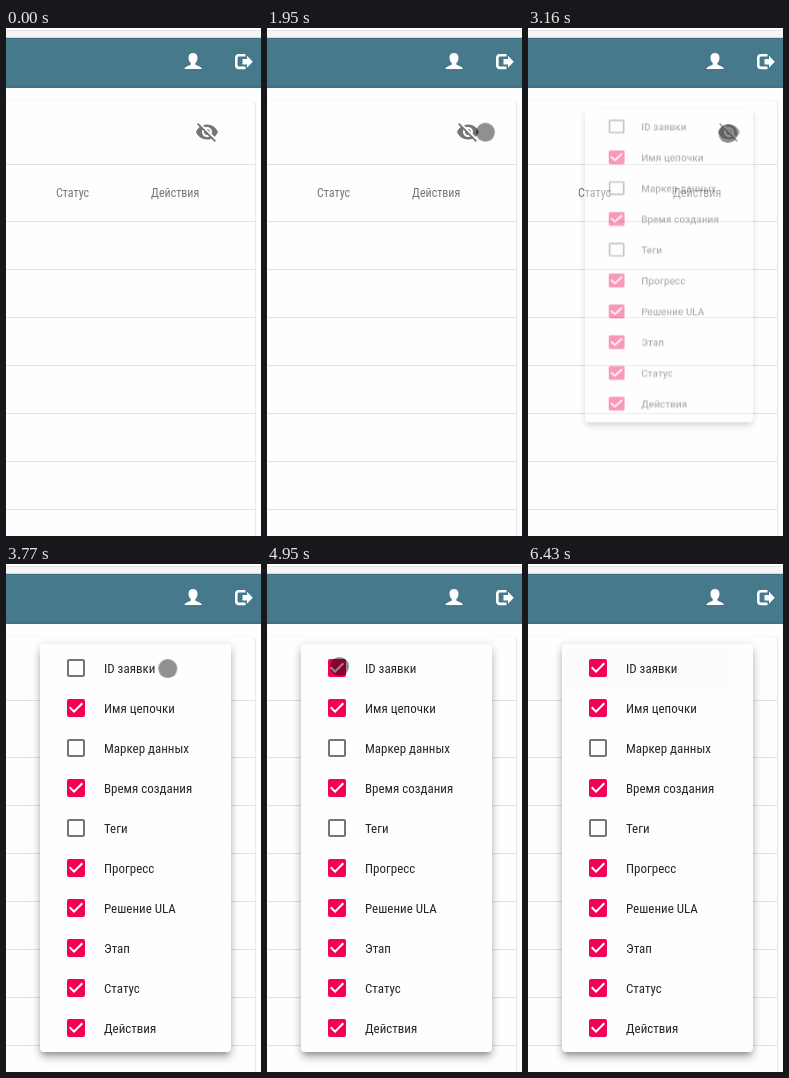
An HTML page that plays this animation: 255 by 508 pixels, repeating every 7340 ms.

```html
<!DOCTYPE html>
<html lang="ru">
<head>
<meta charset="utf-8">
<title>Настройка столбцов</title>
<style>
  html, body { margin: 0; width: 100%; height: 100%; overflow: hidden; background: #fefefe; }
  body { position: relative; font-family: "Roboto Condensed", Roboto, sans-serif; font-stretch: 75%; }
  body.wide { letter-spacing: -.06em; }
  body.wide text { font-size: 12px; }
  body > *, svg { position: absolute; left: 0; top: 0; }
  svg { width: 255px; height: 508px; overflow: visible; }
  #card {
    left: -20px; top: 73px; width: 269px; height: 460px; border-radius: 3px; background: #fefefe;
    box-shadow: 0 1px 2px rgba(0,0,0,.26), 0 0 1px rgba(0,0,0,.16);
  }
  #menu { width: 255px; height: 508px; transform-origin: 225px 80px; }
  #sheet {
    position: absolute; left: 34px; top: 80px; width: 191px; height: 408px; border-radius: 4px; background: #fefefe;
    box-shadow: 0 5px 5px -3px rgba(0,0,0,.24), 0 7px 9px 0 rgba(0,0,0,.16), 0 2px 9px 1px rgba(0,0,0,.14);
  }
  #hover { position: absolute; left: 37px; top: 84px; width: 164px; height: 40px; background: #fbfbfb; }
  #dot { left: -9.5px; top: -9.5px; width: 19px; height: 19px; border-radius: 50%; background: rgba(0,0,0,.43); }
  text { font-size: 13px; fill: #262626; }
  .head text { font-size: 12px; fill: #757575; }
</style>
</head>
<body>
<div id="card"></div>
<svg>
  <rect width="255" height="10" fill="#f5f5f5"/>
  <rect width="255" height="2" fill="#fdfdfd"/>
  <rect y="2" width="255" height="1" fill="#e6e6e6"/>
  <rect y="9" width="255" height="1" fill="#d3dbde"/>
  <rect y="10" width="255" height="50" fill="#45798b"/>
  <rect y="10" width="255" height="1" fill="#3d6f80"/>
  <rect y="58" width="255" height="2" fill="#40708a"/>
  <g fill="#fff">
    <path d="M187 25c2.900 0 4.500 2 4.500 4.800 0 2.400-1 4.400-2.200 5.400v1.300c1 1 6.200 1.800 6.600 4.500H178.500c.4-2.700 5.400-3.500 6.400-4.500v-1.300c-1.300-1-2.400-3-2.400-5.400C182.500 27 184.100 25 187 25z"/>
    <path d="M238 31h3v-3.200l5.800 6-5.800 6v-3.300h-4.500V31z"/>
  </g>
  <path d="M239.500 27.300H233a2.700 2.700 0 0 0-2.700 2.700v7.200a2.700 2.700 0 0 0 2.700 2.700h6.500" fill="none" stroke="#fff" stroke-width="2.600"/>
  <g id="lines" fill="#e0e0e0"></g>
  <g class="head"><text x="50" y="169">Статус</text><text x="145" y="169">Действия</text></g>
  <path transform="translate(189 92)" fill="#757575" d="M12 7c2.760 0 5 2.240 5 5 0 .65-.13 1.260-.36 1.830l2.920 2.920c1.510-1.260 2.700-2.890 3.430-4.750-1.730-4.390-6-7.500-11-7.500-1.400 0-2.740.25-3.980.7l2.160 2.160C10.740 7.130 11.350 7 12 7zM2 4.270l2.740 2.740C3.080 8.300 1.780 10.020 1 12c1.730 4.390 6 7.500 11 7.500 1.550 0 3.030-.3 4.380-.84L19.730 22 21 20.730 3.270 3 2 4.270zM7.530 9.800l1.550 1.550c-.05.21-.08.43-.08.65 0 1.660 1.340 3 3 3 .22 0 .44-.03.65-.08l1.550 1.550c-.67.33-1.410.53-2.200.53-2.760 0-5-2.240-5-5 0-.79.2-1.530.53-2.200zm4.310-.78l3.150 3.150.02-.16c0-1.660-1.340-3-3-3l-.17.01z"/>
</svg>
<div id="menu">
  <div id="sheet"></div>
  <div id="hover"></div>
  <svg id="list"></svg>
</div>
<div id="dot"></div>
<script>
const LOOP = 7340;
const $ = id => document.getElementById(id);

const ON = 'M19 3H5c-1.110 0-2 .9-2 2v14c0 1.100.89 2 2 2h14c1.110 0 2-.9 2-2V5c0-1.100-.89-2-2-2zm-9 14l-5-5 1.410-1.410L10 14.170l7.590-7.590L19 8l-9 9z';
const OFF = 'M19 5v14H5V5h14m0-2H5c-1.100 0-2 .9-2 2v14c0 1.100.9 2 2 2h14c1.100 0 2-.9 2-2V5c0-1.100-.9-2-2-2z';
const rows = [
  ['ID заявки', 0], ['Имя цепочки', 1], ['Маркер данных', 0], ['Время создания', 1], ['Теги', 0],
  ['Прогресс', 1], ['Решение ULA', 1], ['Этап', 1], ['Статус', 1], ['Действия', 1]
];

const box = (on, y, id = '') =>
  `<path ${id} transform="translate(58 ${y})" fill="${on ? '#f50057' : '#757575'}" d="${on ? ON : OFF}"/>`;

$('list').innerHTML = rows.map(([label, on], i) => {
  const y = 92 + 40 * i;
  const mark = i ? box(on, y) : box(0, y, 'id="off"') + box(1, y, 'id="on"');
  return `${mark}<text x="98" y="${y + 17}">${label}</text>`;
}).join('');

let lines = '<rect y="136" width="249" height="1"/>';
for (let y = 193; y < 508; y += 48) lines += `<rect y="${y}" width="249" height="1"/>`;
$('lines').innerHTML = lines;

// Tighter spacing when no condensed face is present
if ($('list').querySelectorAll('text')[3].getComputedTextLength() > 94) document.body.classList.add('wide');

// Each step [time, style] holds until the next one
function play(el, steps) {
  const keys = steps.map(([t, style]) => ({ ...style, offset: t / LOOP, easing: 'step-end' }));
  keys.push({ ...keys[keys.length - 1], offset: 1 });
  return el.animate(keys, { duration: LOOP, iterations: Infinity });
}

const at = (x, y, opacity = 1) => ({ transform: `translate(${x}px, ${y}px)`, opacity });

function move(start, gap, n, [x0, y0], [x1, y1], ease) {
  return Array.from({ length: n }, (_, k) => {
    const p = ease(k, n);
    return [start + gap * k, at(x0 + (x1 - x0) * p, y0 + (y1 - y0) * p)];
  });
}

const slow = (k, n) => 1 - (1 - (k + 1) / n) ** 1.25;
const swing = (k, n) => { const p = k / (n - 1); return p * p * (3 - 2 * p); };

const all = [
  play($('dot'), [
    [0, at(252.5, 99.5, 0)],
    [1550, at(252.5, 99.5)],
    ...move(1610, 84.28, 8, [252.5, 99.5], [203.5, 105.5], slow),
    ...move(2300, 90, 3, [203.5, 105.5], [199.5, 105], slow),
    ...move(3680, 88.5, 8, [199.5, 105], [73, 102], slow),
    [4460, at(72, 102)],
    [5280, at(74, 101.5)],
    ...move(5770, 82.5, 8, [74, 101.5], [210.5, 113.5], swing),
    [6430, at(210.5, 113.5, 0)]
  ]),
  play($('menu'), [
    [0, { opacity: 0, transform: 'scale(.8, .64)' }],
    [3160, { opacity: .4, transform: 'scale(.88, .77)' }],
    [3220, { opacity: .8, transform: 'scale(.97, .94)' }],
    [3280, { opacity: 1, transform: 'none' }]
  ]),
  play($('off'), [[0, { opacity: 1 }], [4950, { opacity: 0 }]]),
  play($('on'), [[0, { opacity: 0 }], [4950, { opacity: 1 }]]),
  play($('hover'), [0, 5032, 5115, 5197, 5280].map((t, i) => [t, { opacity: i / 4 }]))
];
all.forEach(a => { a.startTime = document.timeline.currentTime || 0; });
</script>
</body>
</html>
```
